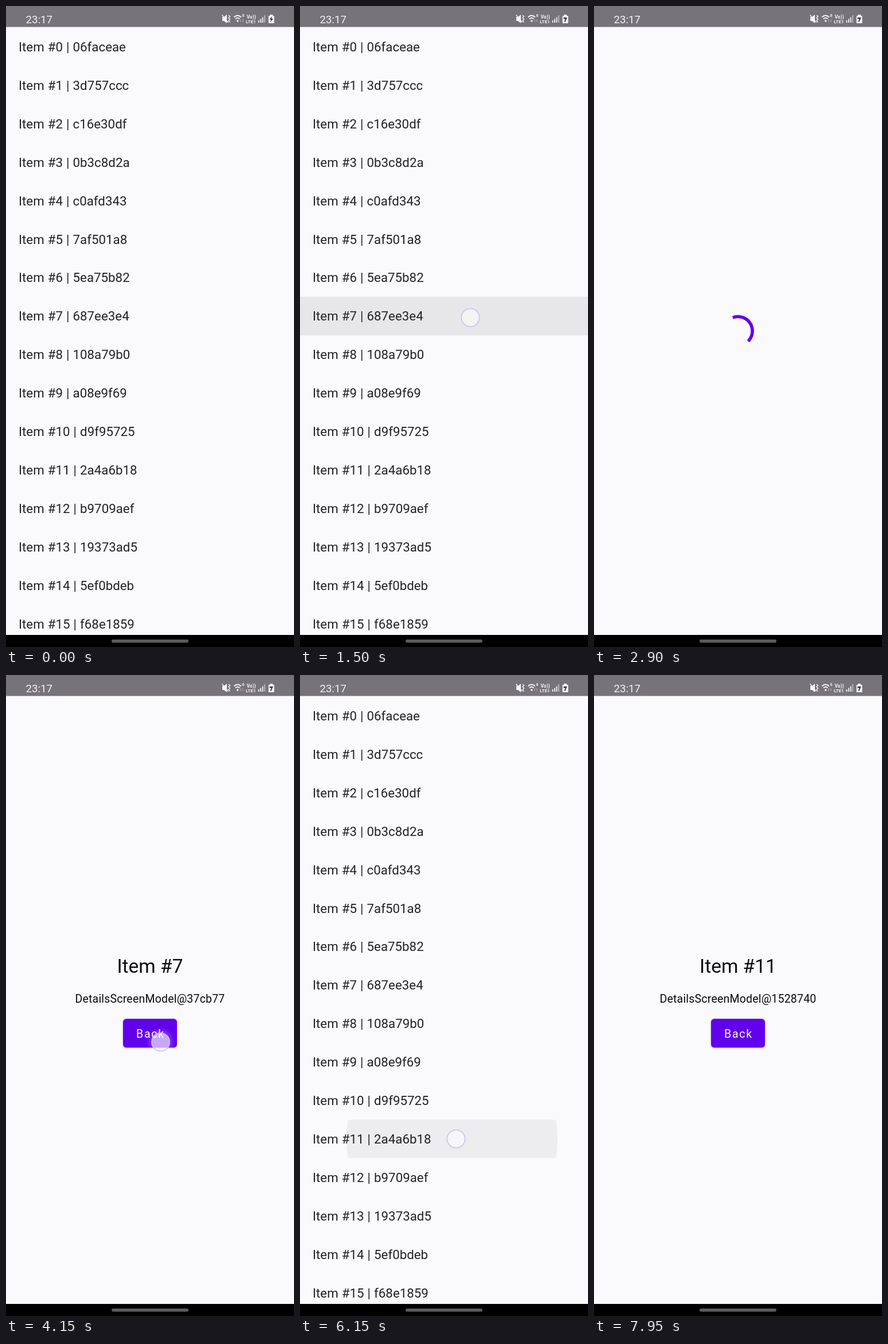
An HTML page that plays this animation: 502 px wide and 1115 px high, repeating every 8000 ms.

```html
<!DOCTYPE html>
<html lang="en">
<head>
<meta charset="utf-8">
<title>List and details</title>
<style>
  html, body { margin: 0; width: 100%; height: 100%; overflow: hidden; background: #faf9fc; }
  svg { display: block; width: 502px; height: 1115px; font-family: Roboto, sans-serif; }
  #list { font-size: 22.3px; word-spacing: .5px; fill: #232225; white-space: pre; }
  #details { text-anchor: middle; fill: #0c0b0d; }
  #button { filter: drop-shadow(0 1.5px 1.5px rgba(0, 0, 0, .3)); }
</style>
</head>
<body>
<svg viewBox="0 0 502 1115">
  <defs>
    <clipPath id="rowClip"><rect id="rowBox" width="502" height="66.9"/></clipPath>
    <clipPath id="buttonClip"><rect x="204" y="598" width="94" height="50" rx="5.6"/></clipPath>
    <radialGradient id="glow">
      <stop offset=".55" stop-color="#fff" stop-opacity=".24"/>
      <stop offset="1" stop-color="#fff" stop-opacity="0"/>
    </radialGradient>
  </defs>
  <rect width="502" height="1115" fill="#faf9fc"/>

  <g id="list">
    <g clip-path="url(#rowClip)"><circle id="rowRipple"/></g>
  </g>

  <path id="spinner" fill="none" stroke="#6200ee" stroke-width="5.6" stroke-linecap="square"/>

  <g id="details">
    <text id="title" x="251" y="518" font-size="33.5"></text>
    <text id="model" x="251" y="570" font-size="19.5" letter-spacing=".2"></text>
    <rect id="button" x="204" y="598" width="94" height="50" rx="5.6" fill="#6200ee"/>
    <g clip-path="url(#buttonClip)"><circle id="buttonRipple" cx="269.5" cy="638" fill="url(#glow)"/></g>
    <text x="252" y="630.5" font-size="19.5" letter-spacing="1.74" fill="#fff">Back</text>
  </g>

  <circle id="touch" r="15.6" fill="#fff" fill-opacity=".55" stroke="#cbc6ec" stroke-width="1.8"/>

  <rect width="502" height="36.5" fill="#767478"/>
  <g fill="#f4f3f5">
    <text x="34.5" y="29.5" font-size="18.7">23:17</text>
    <path d="M377 19h3l5-4v15l-5-4h-3z"/>
    <path d="M376.500 15.500l11 13M388 16l2.500 2-2.500 2.500 2.500 2.500-2.500 2.500 2.500 3" fill="none" stroke="#f4f3f5" stroke-width="1.4"/>
    <path d="M397.500 19.500q6-6 12.500 0M400 22.500q4-3.500 7.500 0" fill="none" stroke="#f4f3f5" stroke-width="1.8"/>
    <circle cx="403.800" cy="26" r="1.700"/>
    <path d="M409 23v5M413 23v5" stroke="#a9a7ab" stroke-width="1.300"/>
    <g font-weight="700">
      <text x="411.500" y="19" font-size="7">6</text>
      <text x="419.500" y="21.500" font-size="8.500">Vo))</text>
      <text x="418" y="30" font-size="8">LTE1</text>
    </g>
    <path d="M440.500 29v-4M444 29v-6.500M447.500 29v-9.500" stroke="#f4f3f5" stroke-width="1.800"/>
    <path d="M451 29v-13" stroke="#c4c2c6" stroke-width="1.600"/>
    <path d="M460 15h5v2h1.500q1 0 1 1v11q0 1-1 1h-8q-1 0-1-1v-11q0-1 1-1h1.500z"/>
    <path id="bolt" fill="#333"/>
  </g>
  <rect y="1094" width="502" height="21" fill="#000"/>
  <rect x="184" y="1102" width="134" height="5.500" rx="2.750" fill="#5c5b5e"/>
</svg>
<script>
  const LOOP = 8000, STEP = 50, ROW = 66.9;
  const $ = id => document.getElementById(id);
  const set = (id, attrs) => { for (const k in attrs) $(id).setAttribute(k, attrs[k]); };
  const show = (id, on) => { $(id).style.display = on ? '' : 'none'; };
  const clamp = v => Math.max(0, Math.min(1, v));
  const mix = (a, b, p) => a + (b - a) * p;

  const hashes = ('06faceae 3d757ccc c16e30df 0b3c8d2a c0afd343 7af501a8 5ea75b82 687ee3e4 ' +
    '108a79b0 a08e9f69 d9f95725 2a4a6b18 b9709aef 19373ad5 5ef0bdeb f68e1859').split(' ');
  hashes.forEach((hash, i) => {
    const row = document.createElementNS('http://www.w3.org/2000/svg', 'text');
    row.textContent = `Item #${i} | ${hash}`;
    row.setAttribute('x', 22);
    row.setAttribute('y', 79 + i * ROW);
    $('list').append(row);
  });

  // down: finger lands, open: loading screen, phase: spinner head start in ms
  const visits = [
    { down: 1000, open: 2000, phase: 0, row: 7, x: 298.5, y: 541, id: '37cb77' },
    { down: 6050, open: 6900, phase: 14, row: 11, x: 272, y: 807, id: '1528740' }
  ];
  const LOAD = 1050, BACK_DOWN = 4150, BACK_UP = 4800;

  // cubic-bezier(.4, 0, .2, 1)
  function ease(x) {
    let lo = 0, hi = 1, u = .5;
    for (let i = 0; i < 24; i++) {
      u = (lo + hi) / 2;
      const v = 1 - u;
      if (1.2 * v * v * u + .6 * v * u * u + u * u * u < x) lo = u; else hi = u;
    }
    return u * u * (3 - 2 * u);
  }

  function drawSpinner(ms) {
    const head = 290 * ease(clamp(ms / 666)), tail = 290 * ease(clamp((ms - 666) / 666));
    const from = tail + 286 * ms / 1332 + 5.73;
    const sweep = Math.max(head - tail, .1);
    const point = deg => {
      const a = (deg - 90) * Math.PI / 180;
      return `${(251 + 25.1 * Math.cos(a)).toFixed(3)} ${(565.4 + 25.1 * Math.sin(a)).toFixed(3)}`;
    };
    set('spinner', { d: `M${point(from)}A25.1 25.1 0 ${+(sweep > 180)} 1 ${point(from + sweep)}` });
  }

  function drawRowRipple(v, t) {
    const p = clamp((t - v.down - 50) / 150), top = 37.5 + v.row * ROW;
    set('rowBox', { y: top });
    set('rowRipple', {
      cx: mix(v.x, 251, p), cy: mix(v.y, top + ROW / 2, p), r: mix(120, 260, ease(p)),
      'fill-opacity': .09 * clamp(p * 2)
    });
  }

  function touchAt(v, t) {
    const moved = v.row === 7 && t >= 1450;
    const alpha = t < v.open ? clamp((t - v.down + STEP) / 100) : .95 * clamp(1 - (t - v.open) / 200);
    return [v.x - (moved ? 1.5 : 0), v.y + (moved ? 1 : 0), alpha];
  }

  function render(t) {
    const v = visits[t < visits[1].down ? 0 : 1];
    const listed = t < v.open || (t >= BACK_UP && t < visits[1].open);
    const loading = !listed && t < v.open + LOAD;
    show('list', listed);
    show('spinner', loading);
    show('details', !listed && !loading);

    if (loading) drawSpinner(t - v.open + v.phase);
    $('title').textContent = 'Item #' + v.row;
    $('model').textContent = 'DetailsScreenModel@' + v.id;

    const pressed = t >= v.down && t < v.open;
    show('rowRipple', pressed);
    if (pressed) drawRowRipple(v, t);

    const p = clamp((t - BACK_DOWN) / 350);
    set('buttonRipple', { r: t >= BACK_DOWN && t < BACK_UP ? mix(25, 165, ease(p)) : 0 });

    let touch = [0, 0, 0];
    if (t >= BACK_UP && t < visits[1].down) touch = [271.5, 641, Math.max(.2, .7 - (t - BACK_UP) / 300)];
    else if (t >= BACK_DOWN && t < BACK_UP) touch = [269.5, 638.5, 1];
    else if (t >= v.down) touch = touchAt(v, t);
    set('touch', { cx: touch[0], cy: touch[1], opacity: touch[2] });

    set('bolt', { d: t < 800 ? 'M463.500 18l-4 5.500h2.500l-1 4.500 4.500-6h-2.500z' : 'M459.500 20h6l-3 7.500h-2l2-5h-3z' });
  }

  const start = performance.now();
  function tick() {
    const t = (performance.now() - start) % LOOP;
    render(Math.floor(t / STEP) * STEP);
    requestAnimationFrame(tick);
  }
  render(0);
  requestAnimationFrame(tick);
</script>
</body>
</html>
```
